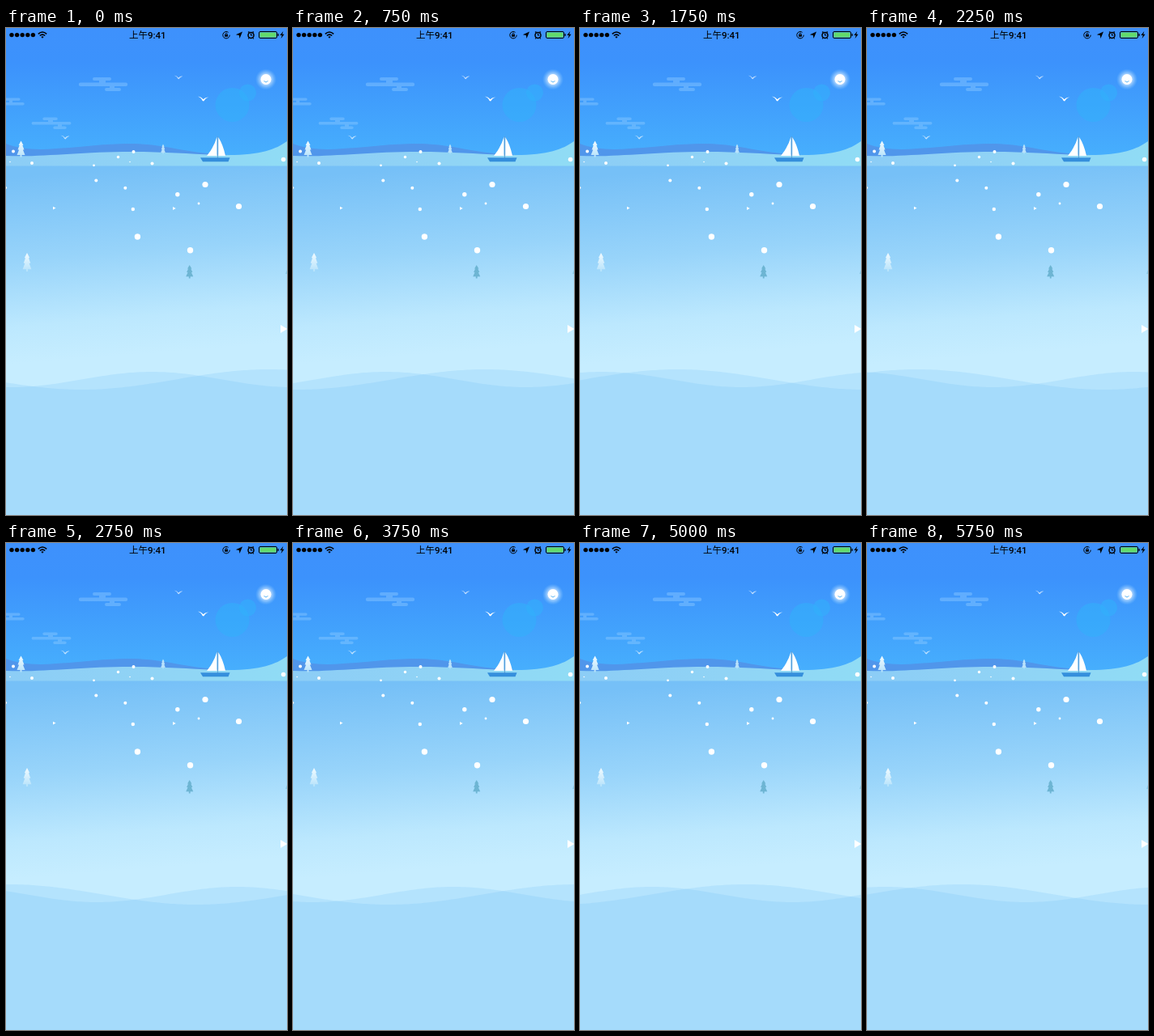
An HTML page that plays this animation: 347x602 px, repeating every 6000 ms.

```html
<!DOCTYPE html>
<html lang="zh">
<head>
<meta charset="utf-8">
<title>Winter sea</title>
<style>
  html, body { margin: 0; width: 100%; height: 100%; overflow: hidden; background: #c6edff; }
  svg { display: block; width: 347px; height: 602px; }
  text { font: 500 11.5px Roboto, "Noto Sans CJK SC", "Noto Sans CJK", sans-serif; }
  .wave { fill: #64b4f5; fill-opacity: .18; animation: drift 6s steps(24, end) infinite; }
  @keyframes drift { to { transform: translateX(var(--shift)); } }
</style>
</head>
<body>
<svg viewBox="0 0 347 602">
  <defs>
    <linearGradient id="sky" x2="0" y2="1">
      <stop stop-color="#3e91fc"/><stop offset=".25" stop-color="#3c92fc"/><stop offset="1" stop-color="#48b2fd"/>
    </linearGradient>
    <linearGradient id="sea" gradientUnits="userSpaceOnUse" x1="160" y1="172" x2="178" y2="402">
      <stop stop-color="#76c0f7"/><stop offset=".45" stop-color="#98d4fa"/>
      <stop offset=".8" stop-color="#bce8fe"/><stop offset="1" stop-color="#c6edff"/>
    </linearGradient>
    <linearGradient id="ice">
      <stop stop-color="#8ccdf6"/><stop offset=".5" stop-color="#90d3f5"/><stop offset="1" stop-color="#90dcf5"/>
    </linearGradient>
    <linearGradient id="frost" x2="0" y2="1">
      <stop stop-color="#f2fbff"/><stop offset="1" stop-color="#b5e2fb"/>
    </linearGradient>
    <radialGradient id="glow">
      <stop offset=".45" stop-color="#fff" stop-opacity=".65"/><stop offset="1" stop-color="#9fd8ff" stop-opacity="0"/>
    </radialGradient>
    <path id="tree" d="M0 0L3 5.5H1.8L4 11H2.4L5 17.5H1V20H-1V17.5H-5L-2.4 11H-4L-1.8 5.5H-3Z"/>
    <path id="bird" d="M-6-2.6Q-2.5-2.8 0 .7Q2.6-2.2 6-1.5Q2.6-.8 .6 2.7L-.8 2.2Q-2-1.5-6-2.6Z"/>
  </defs>

  <rect width="347" height="602" fill="#c6edff"/>
  <rect width="347" height="171" fill="url(#sky)"/>

  <g fill="#32b1fb" fill-opacity=".55">
    <circle cx="279.500" cy="95" r="21"/><circle cx="298.500" cy="80" r="10.500"/>
  </g>
  <circle cx="321" cy="63.500" r="13" fill="url(#glow)"/>
  <circle cx="321" cy="63.500" r="6.500" fill="#fff"/>
  <path d="M318.500 65.500Q321 68.500 323.500 65.500" fill="none" stroke="#5ab4f5"/>

  <g fill="#8fcbff" fill-opacity=".42">
    <path d="M109 61h19a2 2 0 0 1 0 4h-5v2.500h25a2.200 2.200 0 0 1 0 4.400h-14v2h6a2 2 0 0 1 0 4h-16a2 2 0 0 1 0-4h4v-2H92a2.200 2.200 0 0 1 0-4.400h23V65h-6a2 2 0 0 1 0-4Z"/>
    <path d="M47 110.500h15a1.700 1.700 0 0 1 0 3.500h-4v2h21a1.800 1.800 0 0 1 0 3.500H69v2h4a1.700 1.700 0 0 1 0 3.500H60a1.700 1.700 0 0 1 0-3.500h4v-2H33a1.800 1.800 0 0 1 0-3.500h19v-2h-5a1.700 1.700 0 0 1 0-3.500Z"/>
    <path d="M0 86.500h16a1.600 1.600 0 0 1 0 3.200H8V92h13a1.700 1.700 0 0 1 0 3.400H0V92h4v-2.300H0Z"/>
  </g>

  <g fill="#fff">
    <use href="#bird" transform="translate(243.500 87.500) scale(1.100)"/>
    <use href="#bird" transform="translate(213 61) scale(.85)" fill-opacity=".65"/>
    <use href="#bird" transform="translate(73 135) scale(.9)" fill-opacity=".65"/>
  </g>

  <path d="M0 143C18 150 38 151 62 149C98 147 120 143 153 143C198 143 224 156 272 156V171H0Z" fill="#5096eb"/>
  <path d="M0 158C45 160 90 153 155 153C205 153 240 157 275 157C315 157 333 150 347 140V171H0Z" fill="url(#ice)"/>
  <rect y="170.500" width="347" height="251.500" fill="url(#sea)"/>

  <g fill="url(#frost)">
    <use href="#tree" transform="translate(18.500 139.500)"/>
    <use href="#tree" transform="translate(194 143.500) scale(.55 .6)" fill="#b9e2fb"/>
    <use href="#tree" transform="translate(26 278) scale(1.080 1.150)"/>
  </g>
  <use href="#tree" transform="translate(226.700 293) scale(.9 .82)" fill="#6db5d3"/>
  <path d="M347 299L345 304H347Z" fill="#8dcce9"/>

  <path d="M260.500 134.500V158H248Q257 147 260.500 134.500ZM262.200 135V158H271Q268 144 262.200 135Z" fill="#fff"/>
  <path d="M261.400 134V161" stroke="#5f9dd2" stroke-width="1"/>
  <path d="M240 160.300H276.500L274.500 165.300H243Z" fill="#358fdc"/>

  <g id="snow" fill="#fff">
    <path d="M58 220.800L61.500 222.600L58 224.400ZM206 221L209.700 223L206 225ZM339 367L347.500 372L339 377Z"/>
  </g>

  <g id="waves"></g>

  <g id="status">
    <g id="signal"></g>
    <g fill="none" stroke="#000" stroke-width="1.600">
      <path d="M39.800 7.300Q45 2.700 50.200 7.300M41.800 9.500Q45 6.700 48.200 9.500"/>
      <circle cx="272" cy="8.700" r="4.200" stroke-width="1" stroke-dasharray="22 4.400"/>
      <circle cx="302.500" cy="8.900" r="3.500" stroke-width="1.500"/>
      <path d="M302.500 6.800V9H304.300M299 5.500L300.400 4.300M306 5.500L304.600 4.300M300 12.300L299.200 13.300M305 12.300L305.800 13.300" stroke-width="1.100"/>
      <path d="M270.900 8V7.300a1.100 1.100 0 0 1 2.200 0V8" stroke-width=".8"/>
      <rect x="312.500" y="4.500" width="22" height="8" rx="1.500" stroke-width="1"/>
    </g>
    <path d="M43.400 11L45 12.700L46.600 11Q45 9.600 43.400 11ZM270.100 8h3.800v2.800h-3.800ZM292 4.500L288.500 13L287.800 8.900L283.800 8.300ZM335.500 7h1.200v3h-1.200ZM342.300 4L338.300 9H340.700L339.600 13L343.600 7.700H341.200Z"/>
    <rect x="313.500" y="5.500" width="20" height="6" rx=".6" fill="#62d96b"/>
    <text x="174.800" y="12.700" text-anchor="middle">上午9:41</text>
  </g>
</svg>
<script>
  const PERIOD = 3.96, LOOP = 6, WIDTH = 347, MID = 434.5;
  const $ = id => document.getElementById(id);

  function add(parent, tag, attrs) {
    const node = document.createElementNS('http://www.w3.org/2000/svg', tag);
    for (const key in attrs) node.setAttribute(key, attrs[key]);
    return parent.appendChild(node);
  }

  function dot(parent, x, y, r) {
    add(parent, 'circle', { cx: x, cy: y, r });
  }

  // Both waves share a period; their speeds differ with wavelength.
  function addWave(length, amplitude, crest) {
    const shift = length * LOOP / PERIOD;
    const end = WIDTH + shift + 4;
    let d = 'M0 602';
    for (let x = 0; x <= end; x += 3) {
      const y = MID - amplitude * Math.cos(2 * Math.PI * (x - crest) / length);
      d += `L${x} ${y.toFixed(2)}`;
    }
    const wave = add($('waves'), 'path', { class: 'wave', d: `${d}V602Z` });
    wave.style.setProperty('--shift', `${-shift}px`);
  }

  const flakes = [
    [9, 152.5, 2], [32, 167, 2], [157.5, 153, 2], [138.5, 159.5, 1.7],
    [108.5, 169.8, 1.4], [180.5, 167.5, 2], [153, 165.5, .8], [5, 165.5, .8],
    [111.3, 188.5, 2], [147.3, 197.7, 2], [211.8, 205.7, 2.7], [246, 193.5, 3.6],
    [156.8, 224, 2.2], [238, 217, 1.4], [287.5, 220.5, 3.6], [162.4, 258, 3.7],
    [227.5, 274.8, 3.7], [342.6, 162.5, 2.8], [-.5, 197.5, 1.6]
  ];
  flakes.forEach(flake => dot($('snow'), ...flake));
  for (let i = 0; i < 5; i++) dot($('signal'), 7 + 6.6 * i, 8.6, 2.7);
  addWave(WIDTH, 9.5, 180);
  addWave(WIDTH * 4 / 3, 12.5, 325);
</script>
</body>
</html>
```
